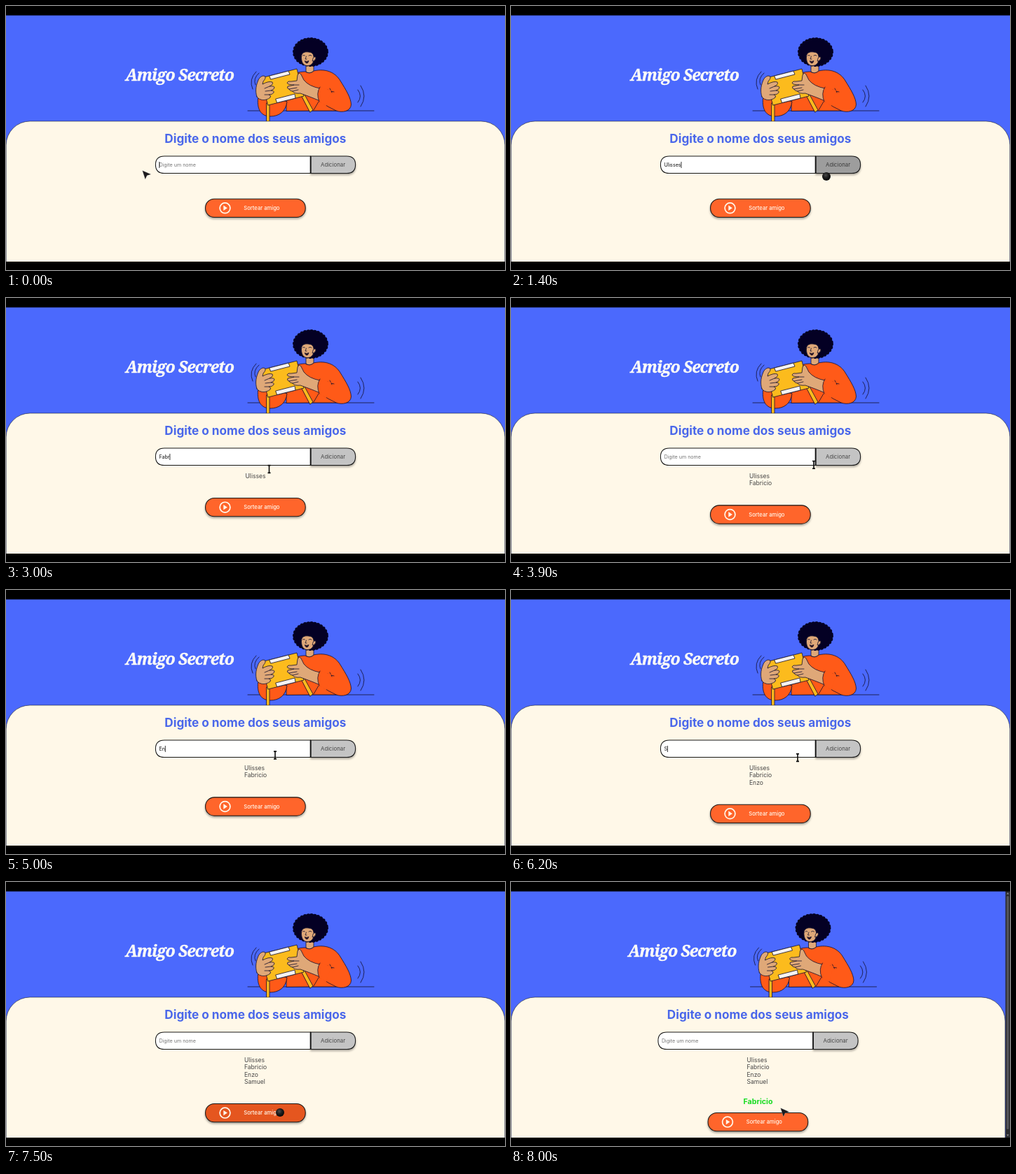
Recreate the animation shown at these times as an HTML page. Size 712 px wide and 378 px high, loop 8400 ms.

```html
<!DOCTYPE html>
<html lang="pt-BR">
<head>
<meta charset="utf-8">
<title>Amigo Secreto</title>
<style>
  html, body { margin: 0; width: 100%; height: 100%; overflow: hidden; background: #000; }
  svg { display: block; width: 100vw; height: 100vh; }
  text { font-family: Inter, sans-serif; white-space: pre; }
  .title { font: italic 700 23px "Noto Serif", serif; letter-spacing: -1px; fill: #fffdf8; stroke: #fffdf8; stroke-width: .35; }
  .head { font-size: 17.17px; font-weight: 700; fill: #4a67ea; }
  .field { font-size: 7.11px; }
  .list { font-size: 8.53px; fill: #444; }
  .result { font-size: 10.67px; font-weight: 700; fill: #18dc22; }
  .mid { text-anchor: middle; }
  .edge { stroke: #161616; stroke-width: 1.05; }
  .shade { filter: drop-shadow(0 2px 1.5px rgba(0, 0, 0, .35)); }
  .ink { stroke: #14102c; stroke-width: .8; stroke-linejoin: round; stroke-linecap: round; }
  .line { fill: none; }
  .orange { fill: #ff5a18; }
  .skin { fill: #dfa878; }
  .gold { fill: #fcbb1d; }
  .tape { fill: #f6f3f2; }
  .hair { fill: #040024; }
  .curls { fill: none; stroke: #040024; stroke-width: 6; stroke-dasharray: 0 4.6; }
</style>
</head>
<body>
<svg viewBox="0 0 712 378">
  <defs>
    <radialGradient id="ball" cx=".42" cy=".36" r=".65">
      <stop offset="0" stop-color="#4a4a4a"/>
      <stop offset=".5" stop-color="#1c1c1c"/>
      <stop offset="1" stop-color="#080808"/>
    </radialGradient>
  </defs>
  <rect width="712" height="378" fill="#4b69fd"/>

  <g class="page">
    <text class="title mid" x="247.700" y="107">Amigo Secreto</text>

    <g class="ink">
      <path class="line" d="M345 150H525"/>
      <path class="line" d="M357 94Q346 105 352 119M361 96Q352 104 356 113M506 114Q516 129 506 144M502 120Q509 129 502 138"/>
      <!-- body and right sleeve -->
      <path class="orange" d="M400 150V112C404 98 416 94 427 94Q433 98 439 93C456 89 470 95 477 107C485 120 492 131 492.500 141C492 151 480 153 471 150H437Z"/>
      <path class="line" d="M459 120Q464 123 468 123M462 118L465 124M448 136Q459 145 471 150M439 149L446 137"/>
      <!-- left sleeve -->
      <path class="orange" d="M360 129C357 148 364 158 377 158C390 158 399 151 401 137L372 125Z"/>
      <!-- head -->
      <path class="skin" d="M428 80V94Q433 98 439 93V78Z"/>
      <ellipse class="hair" cx="434.500" cy="66" rx="23" ry="19"/>
      <ellipse class="curls" cx="434.500" cy="66" rx="22.500" ry="18"/>
      <path class="skin" d="M421.500 72C422 67 426 65 432 66Q438 66 439 72C440 80 437 85.500 430 85.500C424 85.500 421 80 421.500 72Z"/>
      <path class="skin" d="M438.500 74Q442 71 442 75Q441 79 437.500 79Z"/>
      <path class="line" d="M423.500 71Q425 69.500 426.500 71M432 71Q434 69.500 436 71M428.500 72L427 76H429"/>
      <path d="M426.500 79Q429.500 80 432 78.500Q431 82 429 82Q427 81.500 426.500 79Z" fill="#30121c"/>
      <!-- ribbons and parcel -->
      <path class="gold" d="M372 139H376V168H372ZM421 127L425 125L438 149L434 152Z"/>
      <path class="gold" d="M364 103L415 90L425 129L374 142Z"/>
      <path class="tape" d="M376 100L403 93L405 98L378 105ZM385 133L412 126L413 132L387 138.500Z"/>
      <!-- hands -->
      <path class="skin" d="M358 130C355 121 357 112 361 104Q366 98 370 101Q371 104 367 108L366 112Q375 107 380 109Q382 112 376 115Q383 114 383 117Q382 120 378 121Q383 121 382 124Q380 127 375 127Q379 128 377 131C371 136 362 136 358 130Z"/>
      <path class="line" d="M376 115L369 118M378 121L370 122M375 127L369 127"/>
      <path class="skin" d="M448 136C437 131 428 128 420 125Q411 126 409 122Q405 122 404 119Q400 118 402 115L411 113Q402 113 401 110Q402 107 407 108L415 107L416 99Q418 94 421 98L425 106Q432 115 448 118Z"/>
      <path class="line" d="M411 113L418 113M404 119L415 117M409 122L417 120"/>
      <path class="orange" d="M448 116Q442 125 447 137L457 143L464 121Z" stroke="none"/>
      <path class="line" d="M448 116Q442 125 447 137"/>
    </g>
  </g>

  <rect id="panel" x=".2" y="165" height="240" rx="34" fill="#fff8e8" stroke="#111" stroke-width=".53"/>

  <g class="page">
    <text class="head mid" x="355.900" y="196.200">Digite o nome dos seus amigos</text>

    <g class="edge">
      <path id="add" class="shade" d="M434.800 215H486Q498.600 215 498.600 227.300T486 239.500H434.800Z"/>
      <path d="M434.500 215H226Q213.400 215 213.400 227.300T226 239.500H434.500Z" fill="#fff"/>
      <path d="M434.600 215V239.800" stroke-width="1.800"/>
    </g>
    <text id="addText" class="mid" x="466.600" y="230" font-size="7.850">Adicionar</text>
    <text id="field" class="field" x="218.400" y="229.800"></text>
    <path id="caret" d="M0 223V232" stroke="#000" stroke-width=".8"/>

    <g id="list" class="list"></g>
    <text id="result" class="result mid" x="356" y="317.500"></text>

    <g id="draw">
      <rect id="drawBox" class="shade edge" x="284.600" y=".2" width="142.600" height="26.300" rx="12.500"/>
      <circle cx="312.500" cy="13.300" r="7.400" fill="none" stroke="#fff8ec" stroke-width="1.700"/>
      <path d="M310.300 9.600V17L315.900 13.300Z" fill="#fff8ec"/>
      <text x="339.300" y="16" font-size="7.600" font-weight="500" fill="#fff8ec">Sortear amigo</text>
    </g>
  </g>

  <g id="bar">
    <rect x="705.500" y="13" width="6.500" height="353" fill="#2b2b2e"/>
    <rect x="707.200" y="20" width="3.200" height="334" rx="1.600" fill="#55555a"/>
    <path d="M707 17.500L708.800 15L710.600 17.500ZM707 361.500L708.800 364L710.600 361.500Z" fill="#8a8a8e"/>
  </g>

  <path d="M0 0H712V13.500H0ZM0 366H712V378H0Z"/>

  <g id="cursor">
    <path id="arrow" d="M-6.500-6.500L6-1L.2.800L-2.300 6.300Z" fill="#1d1b1d" stroke="#fff" stroke-opacity=".5" stroke-width=".4"/>
    <path id="beam" d="M-2-5.400H2M-2 5.400H2M0-5.400V5.400" fill="none" stroke="#0a0a0a" stroke-width="1.600"/>
    <circle id="hand" r="6" fill="url(#ball)"/>
  </g>
</svg>

<script>
const LOOP = 8400, STEP = 100, DRAWN = 7900, ROW = 10.33;

// focus: caret appears; keys: time of each letter; add: name joins the list
const friends = [
  { name: 'Ulisses', focus: 0, keys: [100, 200, 400, 500, 600, 700, 800], add: 1500 },
  { name: 'Fabricio', focus: 2400, keys: [2700, 2800, 2900, 3000, 3100, 3200, 3300, 3300], add: 3900 },
  { name: 'Enzo', focus: 4400, keys: [4700, 4800, 5100, 5100], add: 5700 },
  { name: 'Samuel', focus: 6000, keys: [6200, 6300, 6400, 6500, 6600, 6600], add: 7200 }
];

// time, x, y
const path = [
  [0, 201, 242], [1000, 201, 242], [1400, 450, 244], [1500, 446, 245], [1700, 375.5, 245],
  [3500, 375.5, 245], [3700, 455, 241], [3800, 456, 240], [4100, 384, 236.5],
  [5300, 384, 236.5], [5600, 455, 240], [5700, 453, 240], [6000, 409, 240],
  [6800, 409, 240], [7100, 455, 240], [7200, 453, 243], [7500, 391, 330], [LOOP, 391, 330]
];

const $ = id => document.getElementById(id);
const set = (id, attrs) => { for (const k in attrs) $(id).setAttribute(k, attrs[k]); };
const show = (id, on) => set(id, { visibility: on ? 'visible' : 'hidden' });
const pages = document.querySelectorAll('.page');

const rows = friends.map((f, i) => {
  const row = document.createElementNS('http://www.w3.org/2000/svg', 'text');
  row.textContent = f.name;
  row.setAttribute('y', 258 + i * ROW);
  $('list').append(row);
  return row;
});
$('result').textContent = friends[1].name;

const count = t => friends.filter(f => t >= f.add).length;
const drawY = t => 276 + count(t) * ROW + (t >= DRAWN ? 13 : 0);

function pointer(t) {
  const i = path.findIndex((p, n) => n && t < p[0]);
  const [t0, x0, y0] = path[i - 1], [t1, x1, y1] = path[i];
  const k = (t - t0) / (t1 - t0);
  return [x0 + (x1 - x0) * k, y0 + (y1 - y0) * k];
}

function render(time) {
  const t = Math.floor((time % LOOP) / STEP) * STEP;
  const n = count(t), drawn = t >= DRAWN;

  const shift = drawn ? -3.5 : 0;
  pages.forEach(p => p.setAttribute('transform', `translate(${shift} 0)`));
  set('panel', { width: drawn ? 704.8 : 711.6 });
  show('bar', drawn);
  show('result', drawn);

  const friend = friends[n];
  const typed = friend ? friend.name.slice(0, friend.keys.filter(k => t >= k).length) : '';
  $('field').textContent = typed || 'Digite um nome';
  set('field', { fill: typed ? '#111' : '#757575' });
  show('caret', friend && t >= friend.focus);
  const end = typed ? $('field').getComputedTextLength() : 0;
  set('caret', { transform: `translate(${218.8 + end} 0)` });

  rows.forEach((row, i) => {
    row.setAttribute('x', n > 1 ? 340 : 341.5);
    row.setAttribute('visibility', i < n ? 'visible' : 'hidden');
  });
  set('draw', { transform: `translate(0 ${drawY(t)})` });

  // hover follows a layout change one step late
  const [x, y] = pointer(t), hx = x - 6, hy = y - 6;
  const top = drawY(Math.max(0, t - STEP));
  const inRow = hy > 215 && hy < 240;
  const onField = inRow && hx > 213 && hx < 435;
  const onAdd = inRow && hx >= 435 && hx < 499;
  const onDraw = hy > top && hy < top + 27 && hx > 284 && hx < 427;
  set('add', { fill: onAdd ? '#9d9d9d' : '#c4c4c4' });
  set('addText', { fill: onAdd ? '#3c3c3c' : '#484848' });
  set('drawBox', { fill: onDraw ? '#e5561f' : '#ff652b' });
  set('cursor', { transform: `translate(${x} ${y})` });
  show('beam', onField);
  show('hand', onAdd || onDraw);
  show('arrow', !onField && !onAdd && !onDraw);
}

let start;
function tick(now) {
  start ??= now;
  render(now - start);
  requestAnimationFrame(tick);
}
render(0);
requestAnimationFrame(tick);
</script>
</body>
</html>
```
